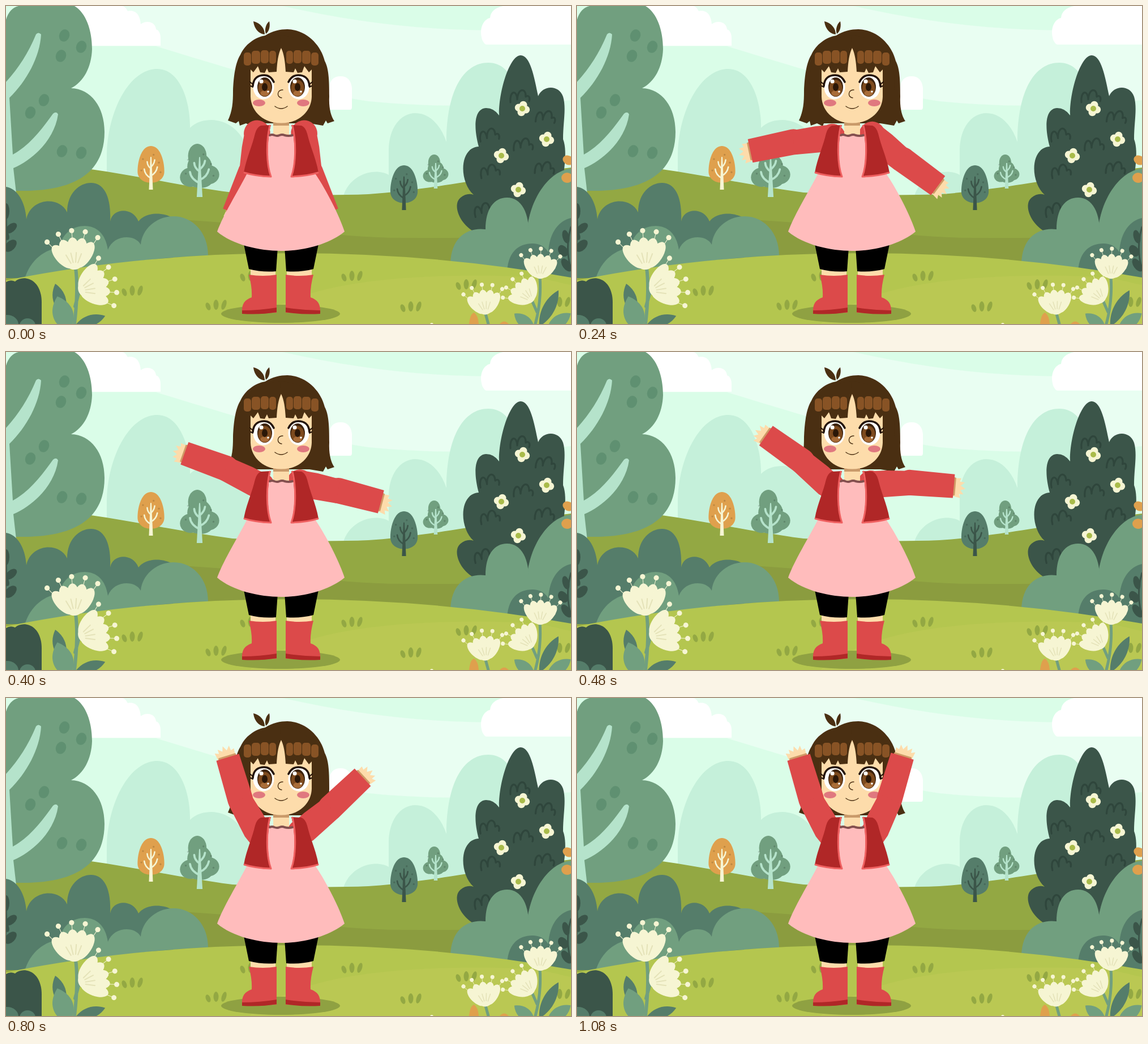
Recreate the animation shown at these times as an HTML page. Size 998x561 px, loop 1.6 s.

```html
<!DOCTYPE html>
<html lang="en">
<head>
<meta charset="utf-8">
<title>Girl in a meadow raising her arms</title>
<style>
html, body { margin: 0; width: 100%; height: 100%; overflow: hidden; background: #dafde8 }
svg { display: block; width: 100vw; height: 100vh }
</style>
</head>
<body>
<svg id="stage" viewBox="0 0 998 561" preserveAspectRatio="none"></svg>
<script>
const SKY = '#dafde8', HAZE = '#e9fef2', FAR = '#c5f0da', MINT = '#b5e3cb',
  SAGE = '#719f7f', PINE = '#557d6a', DARK = '#3b5549', OLIVE = '#93a843',
  GRASS = '#b4c64f', CREAM = '#f6f5d3', ORANGE = '#dfa04d',
  HAIR = '#4a2f12', SKIN = '#fddcab', RED = '#dc4a4a', WINE = '#b02727';

const shape = (fill, d) => `<path fill="${fill}" d="${d}"/>`;
const line = (color, w, d) =>
  `<path fill="none" stroke="${color}" stroke-width="${w}" stroke-linecap="round" stroke-linejoin="round" d="${d}"/>`;
const oval = (fill, x, y, rx, ry = rx, turn = 0) =>
  `<ellipse fill="${fill}" cx="${x}" cy="${y}" rx="${rx}" ry="${ry}" transform="rotate(${turn} ${x} ${y})"/>`;
const place = (x, y, turn, size, body) =>
  `<g transform="translate(${x} ${y}) rotate(${turn}) scale(${size})">${body}</g>`;
const flip = (body, axis) => `<g transform="translate(${2 * axis} 0) scale(-1 1)">${body}</g>`;
const both = body => body + flip(body, 486);
const each = (list, draw) => list.map(item => draw(...item)).join('');

const leaf = (fill, x, y, turn, h, w) =>
  place(x, y, turn, 1, shape(fill, `M0 0C${-w} ${-h * .3} ${-w} ${-h * .7} 0 ${-h}C${w} ${-h * .7} ${w} ${-h * .3} 0 0Z`));

const tuft = (x, y) =>
  oval(OLIVE, x - 14, y + 3, 4, 7, -22) + oval(OLIVE, x, y, 4.5, 9) + oval(OLIVE, x + 14, y, 4, 9, 18);

// Cup-shaped bloom growing upwards from its base, ringed by stamens.
function bloom(x, y, turn, size) {
  let body = '';
  for (const a of [-42, -21, 0, 21, 42]) {
    body += `<g transform="rotate(${a * .9})">${oval(CREAM, 0, -32, 12, 26)}</g>`;
    body += `<g transform="rotate(${a * .95})">${line(CREAM, 1, 'M0-50V-70') + oval(CREAM, 0, -70, 4.6)}</g>`;
  }
  body += oval(CREAM, 0, -20, 18, 19);
  for (const a of [-26, -9, 9, 26])
    body += `<g transform="rotate(${a})">${line('#e4e2b8', 2, 'M0-14V-31')}</g>`;
  return place(x, y, turn, size, body);
}

const daisy = (x, y) => {
  const petals = [15, 105, 195, 285].map(a => {
    const r = a * Math.PI / 180;
    return oval(CREAM, x + 6.6 * Math.cos(r), y + 6.6 * Math.sin(r), 6.8);
  });
  return petals.join('') + oval('#a9bb4a', x, y, 5);
};

// Small tree; x is the trunk, top and foot its vertical extent.
function tree(x, top, foot, w, crown, wood, lumpy) {
  const h = foot - top, mid = top + h * .43;
  const foliage = lumpy
    ? oval(crown, x - w * .06, top + h * .23, w * .24, h * .23) +
      oval(crown, x, mid, w * .32, h * .24) +
      oval(crown, x - w * .24, top + h * .63, w * .27, h * .18) +
      oval(crown, x + w * .23, top + h * .58, w * .28, h * .18) +
      oval(crown, x + w * .02, top + h * .68, w * .32, h * .15)
    : shape(crown, `M${x} ${top}C${x + w * .4} ${top} ${x + w * .52} ${mid} ${x + w * .5} ${mid + h * .18}C${x + w * .45} ${top + h * .92} ${x - w * .45} ${top + h * .92} ${x - w * .5} ${mid + h * .18}C${x - w * .52} ${mid} ${x - w * .4} ${top} ${x} ${top}Z`);
  const trunk = shape(wood, `M${x - 1} ${top + h * .25}H${x + 1}L${x + w * .075} ${foot}H${x - w * .075}Z`) +
    line(wood, w * .055, `M${x} ${foot - h * .26}Q${x - w * .23} ${foot - h * .34} ${x - w * .25} ${foot - h * .47}M${x} ${foot - h * .32}Q${x + w * .2} ${foot - h * .38} ${x + w * .24} ${foot - h * .52}M${x} ${foot - h * .48}Q${x - w * .13} ${foot - h * .54} ${x - w * .14} ${foot - h * .64}M${x} ${foot - h * .52}Q${x + w * .12} ${foot - h * .58} ${x + w * .14} ${foot - h * .68}`);
  const dots = each([[-.3, .3], [.3, .38], [-.36, .56], [.36, .6], [.1, .2]],
    (dx, dy) => `<circle cx="${x + dx * w}" cy="${top + dy * h}" r="1.7" opacity=".15"/>`);
  return foliage + dots + trunk;
}

const curl = (x, y, turn = 0) =>
  place(x, y, turn, 1, line('#2f463c', 3.2, 'M-15 12C-17-8-4-12-3 7C-2-14 13-14 12 2M12 2C18-2 20 4 18 10'));

const sky =
  `<rect width="998" height="561" fill="${SKY}"/>` +
  shape(HAZE, 'M100 0H488C580 20 690 41 850 43L998 46V166C880 180 740 178 640 168C520 150 400 112 265 71H100Z') +
  shape('#fff', 'M100 70H273V57C273 48 270 43 265 41C264 28 248 24 238 32C237 17 230 6 215 9C212 3 208 0 205 0H100Z' +
    'M848 68H998V0H878C864 3 856 10 855 21C846 23 839 33 839 46C839 57 843 66 848 68Z' +
    'M560 183H608Q611 183 611 178V145Q609 124 591 124Q572 124 571 145Z') +
  shape(FAR, 'M178 340V260C181 180 220 111 267 111C308 111 326 170 325 215C336 204 350 201 363 201C402 202 440 235 445 340Z' +
    'M596 335C605 305 635 290 660 293Q670 294 676 298V255C676 215 697 189 723 189C748 189 768 210 778 240C778 150 808 100 852 100C900 100 925 170 925 340Z');

const land =
  shape(OLIVE, 'M0 278Q80 278 150 288C240 301 320 319 400 329Q540 336 640 332C740 326 830 304 998 285V500H0Z') +
  shape('#8b9c3f', 'M300 377C430 381 560 408 700 409S900 408 998 400V490H300Z') +
  tree(256, 247, 324, 47, ORANGE, CREAM) + tree(342, 243, 337, 68, SAGE, MINT, true) +
  tree(703, 281, 360, 48, PINE, DARK) + tree(759, 262, 322, 44, SAGE, MINT, true);

const leftTree =
  shape(SAGE, 'M0 24Q6 4 22 0H121C141 12 152 42 152 76C151 108 137 134 115 145C150 146 174 178 174 222C174 288 130 326 30 326H0Z') +
  shape(MINT, 'M0 134C22 110 40 82 53 50Q57 45 62 50C60 90 36 133 6 162L12 262C42 246 65 215 83 190Q89 185 92 191C86 234 50 270 13 286L18 330H0Z') +
  each([[103, 52], [133, 72], [97, 88], [67, 166], [43, 188], [99, 256], [133, 259]],
    (x, y) => oval('#5f9071', x, y, 9, 11, 20));

const rightTree =
  shape(DARK, 'M909 87C926 87 933 125 940 159C948 140 976 138 984 160C990 180 984 205 984 235C992 255 985 290 985 300V400H830C800 385 788 350 803 338Q814 329 826 333C800 310 800 250 835 248C826 215 826 181 848 180Q862 180 871 193C870 150 890 87 909 87Z') +
  each([[906, 158, 0], [952, 194, 8], [852, 226, -5], [912, 243, 0], [853, 290, -8], [950, 284, 5], [842, 358, -10]], curl) +
  each([[912, 181], [955, 235], [875, 264], [905, 324]], daisy);

const bushes =
  shape(PINE, 'M0 319C20 322 34 345 36 376C44 338 95 335 108 364C108 330 130 312 150 312C174 312 186 338 184 380C188 356 224 354 234 380C245 365 274 362 295 374V480H0Z') +
  shape(SAGE, 'M33 482C42 448 70 428 95 427C98 400 120 388 139 388C160 388 176 402 180 430C190 403 228 402 238 421C240 394 265 371 296 371C330 371 357 400 357 440C250 444 150 460 33 482Z') +
  shape(SAGE, 'M920 470V400C924 340 960 290 998 287V480Z') +
  shape(SAGE, 'M785 455C786 408 815 390 847 394C847 358 862 338 885 338C911 338 925 366 923 405V470Z') +
  shape(PINE, 'M885 475C885 434 905 419 930 419Q948 419 958 434C960 398 978 378 998 374V490Z') +
  oval(ORANGE, 993, 272, 10, 8, 30) + oval(ORANGE, 991, 303, 10, 9);

const meadow =
  shape(GRASS, 'M0 484Q240 436 500 436T998 479V561H0Z') +
  shape('#bac853', 'M430 561C500 500 640 478 800 476S960 486 998 492V561Z') +
  each([[371, 527], [611, 476], [715, 530], [223, 502], [813, 491], [432, 476], [978, 522]], tuft) +
  oval('#8fa142', 485, 543, 105, 16);

const foreground =
  line(DARK, 3, 'M-4 440Q4 400-2 345M1000 470Q986 430 998 390') +
  each([[0, 362, 6, 14, 0], [9, 392, 7, 12, 50], [8, 423, 8, 13, 45], [-2, 402, 6, 12, -30],
    [989, 407, 6, 12, -15], [984, 432, 8, 11, -35], [990, 457, 7, 13, -35]],
    (x, y, rx, ry, a) => oval(DARK, x, y, rx, ry, a)) +
  shape(DARK, 'M0 487Q8 482 16 486C30 473 64 480 63 525V561H0Z') +
  oval(PINE, 2, 562, 20, 17) + oval(PINE, 38, 564, 14, 13) +
  line(SAGE, 6, 'M123 462Q128 500 121 561M129 504L122 530') +
  leaf(PINE, 102, 546, -15, 58, 15) + leaf(SAGE, 111, 575, -18, 66, 24) + leaf(PINE, 122, 564, 72, 56, 13) +
  bloom(122, 466, -5, 1) + bloom(127, 503, 72, .98) +
  line(SAGE, 5, 'M943 478Q946 520 935 561M930 522L938 540M847 543L852 561') +
  leaf(PINE, 942, 565, 28, 72, 14) + leaf(SAGE, 955, 572, 55, 52, 15) + leaf(SAGE, 934, 571, -52, 46, 14) +
  bloom(943, 482, 2, .77) + bloom(931, 522, -42, .77) + bloom(848, 545, -8, .77) +
  shape(ORANGE, 'M818 561Q820 542 827 541Q834 546 835 561ZM872 561Q880 552 888 561Z') + oval(CREAM, 752, 562, 3);

const eye =
  oval('#fff', 455, 143, 18.5, 21.5) +
  oval('#3c220d', 457, 143, 13, 17) + oval('#7d4a1e', 457, 145, 11.6, 14.5) +
  oval('#a86c38', 457, 154, 7.5, 5) + oval('#2b1708', 457, 143, 5, 7) +
  line('#24140a', 3.6, 'M436 141C437 127 446 122 456 122Q467 122 473 134') +
  line('#24140a', 2, 'M437 139L431 134M436 143L432 141') +
  line(HAIR, 1.6, 'M446 107Q452 102 460 104');

const bangs =
  shape(HAIR, 'M412 150C404 85 445 52 488 52L486 74C481 84 479 98 478 116L464 117 461 110 457 118 449 117 445 106 437 117 432 112V205H412Z') +
  each([[420, 82, 13], [434, 79, 15], [450, 78, 14], [465, 79, 12]],
    (x, y, w) => `<rect x="${x}" y="${y}" width="${w}" height="23" rx="5" fill="#885325"/>`);

const head =
  shape(HAIR, 'M458 52C470 44 485 41 497 41C530 42 556 68 563 97C570 110 571 130 571 160C570 180 574 195 580 203L568 207 565 202 560 211 536 207H436L434 212 424 207 413 211 411 203 406 207 392 202C400 185 401 170 401 150C402 125 405 100 414 86C422 68 440 55 458 52Z') +
  shape(HAIR, 'M457 50C445 49 438 38 437 27C450 30 457 40 457 50ZM459 49C456 40 460 31 465 27C467 35 465 45 459 49Z') +
  shape(SKIN, 'M432 95V160C433 188 457 207 486 207S539 188 540 160V95L494 74H478Z') +
  both(bangs) + both(eye) +
  oval('#fff', 451, 133, 3.6) + oval('#fff', 510, 133, 3.6) + oval('#fff', 463, 151, 1.8) + oval('#fff', 521, 151, 1.8) +
  both(oval('#e0787f', 447, 171, 11, 6)) +
  line(HAIR, 1.4, 'M489 148C479 147 477 161 487 162M475 177Q486 185 497 177');

const legs =
  shape(SKIN, 'M432 460H476V478H432Z') +
  shape('#000', 'M420 420L429 464Q452 470 477 468L480 425Z') +
  shape(RED, 'M429 474Q454 478 478 474V541L417 543C416 527 420 519 434 514Q435 496 429 474Z') +
  shape(WINE, 'M417 537Q448 537 478 532V540Q450 545 417 543Z');

const vest =
  shape(WINE, 'M450 211L468 210C460 240 461 280 469 302Q440 301 420 294C424 270 434 250 440 225Q443 214 450 211Z') +
  line('#ef6060', 3, 'M466 211C459 240 460 280 468 301Q440 300 421 294');

const torso =
  shape(SKIN, 'M472 200H500V236H472Z') + shape('#c99a6a', 'M472 205Q486 208 500 205V211H472Z') +
  shape('#ffbcbc', 'M464 229H508C511 262 522 284 547 297C566 325 589 370 598 398C570 421 525 432 486 432S400 421 373 398C384 368 408 330 425 297C450 284 461 262 464 229Z') +
  line('#84504f', 4, 'M466 228q4-2 8 0q5 2 9 0q5-2 9 0q7 2 14 0') +
  both(vest);

const SHOULDER = [443, 233], UPPER = 61, FORE = 78;
const arm = id => `<g id="${id}"><g class="fore">` +
  shape(SKIN, 'M74 14L90 15 88 9 97 8 90 2 99-3 90-6 96-13 88-13 91-20 74-17Z') +
  shape('#cf9a66', 'M74-18L81-16V15L74 17Z') +
  shape(RED, `M0-23L${FORE}-21V21L0 22A22 22 0 0 1 0-23Z`) + '</g>' +
  shape(RED, `M-16-21L0-24 ${UPPER}-23V20L20 23 0 23A23 23 0 0 1-16-21Z`) + '</g>';

stage.innerHTML = sky + land + leftTree + rightTree + bushes + meadow + both(legs) + head +
  arm('left') + flip(arm('right'), 485) + torso + foreground;

// Each key: time, upper arm angle, forearm angle (degrees above horizontal).
const HANG = [0, -79.5, -68];
const KEYS = {
  left: [HANG, [160, -25, -28], [320, 13, 4], [480, 42, 35], [560, 62, 73]],
  right: [HANG, [160, -52, -48], [320, -24, -25], [480, 3, -5], [640, 22, 19], [800, 41, 43], [1080, 66, 73]]
};

function pose(id, t) {
  const keys = KEYS[id], next = keys.findIndex(k => k[0] > t);
  const b = next < 0 ? keys.at(-1) : keys[next], a = next < 0 ? b : keys[next - 1];
  const p = a === b ? 0 : (t - a[0]) / (b[0] - a[0]);
  const [upper, fore] = [1, 2].map(i => a[i] + (b[i] - a[i]) * p);
  const group = document.getElementById(id);
  group.setAttribute('transform', `translate(${SHOULDER}) rotate(${180 + upper})`);
  group.firstChild.setAttribute('transform', `translate(${UPPER} 0) rotate(${fore - upper})`);
}

function frame() {
  const t = Math.floor(performance.now() % 1600 / 40) * 40;
  pose('left', t);
  pose('right', t);
  requestAnimationFrame(frame);
}
frame();
</script>
</body>
</html>
```
